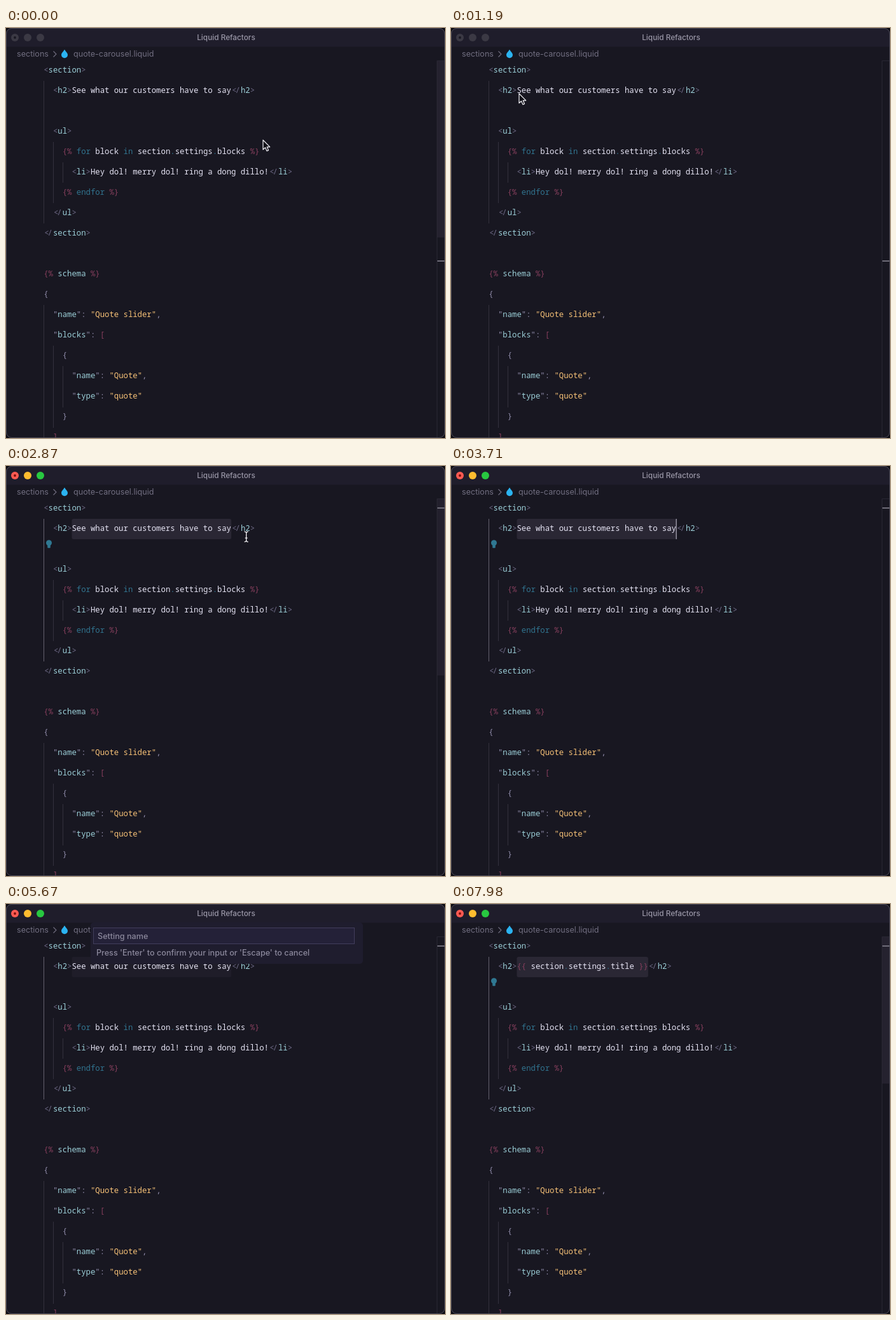
Recreate the animation shown at these times as an HTML page. Size 690 px wide and 644 px high, loop 8 s.

```html
<!DOCTYPE html>
<html lang="en">
<head>
<meta charset="utf-8">
<title>Liquid Refactors</title>
<style>
html, body { margin: 0; width: 100%; height: 100%; overflow: hidden; background: #0c0b12; }
svg { display: block; width: 100vw; height: 100vh; }
text { font: 500 12.6px Inter, Roboto, sans-serif; fill: #8b889c; white-space: pre; }
.code text { font: 500 12.29px "Noto Sans Mono", "DejaVu Sans Mono", monospace; }
.code .g { fill: #6e6a86; }
.code .b { fill: #908caa; }
.code .f { fill: #9ccfd8; }
.code .l { fill: #863f5d; }
.code .p { fill: #31748f; }
.code .w { fill: #e6e4f4; }
.code .y { fill: #f6c177; }
.crumb text { font-weight: 400; fill: #716e80; }
.panel { fill: #1f1d2e; }
.bulb { fill: #2f7892; }
</style>
</head>
<body>
<svg id="stage" viewBox="0 0 690 644" xmlns="http://www.w3.org/2000/svg">
  <defs>
    <clipPath id="frame"><rect width="690" height="644" rx="9"/></clipPath>
    <g id="bulb">
      <circle cy="-1.8" r="4.5"/>
      <path d="M-2.3 1.5H2.3V5.2Q2.3 6.2 1.3 6.2H-1.3Q-2.3 6.2 -2.3 5.2Z"/>
    </g>
  </defs>
  <g clip-path="url(#frame)">
    <rect width="690" height="644" fill="#181721"/>
    <rect width="690" height="29.5" fill="#1f1d2b"/>
    <text x="346" y="19" text-anchor="middle" style="font-size:11.8px;fill:#9996a6">Liquid Refactors</text>
    <g id="lights">
      <circle cx="14" cy="15" r="6"/>
      <circle cx="34" cy="15" r="6"/>
      <circle cx="54" cy="15" r="6"/>
    </g>
    <circle id="dot" cx="14" cy="15" r="1.9"/>

    <g class="crumb">
      <text x="17" y="45">sections</text>
      <path d="M74.5 36.5L79 41L74.5 45.5" fill="none" stroke="#716e80" stroke-width="1.1"/>
      <path d="M92 33.8C93.5 36.8 97 39.4 97 42.2A5 5 0 0 1 87 42.2C87 39.4 90.500 36.8 92 33.8Z" fill="#2bb3f0"/>
      <text x="106" y="45">quote-carousel.liquid</text>
    </g>

    <rect id="slider" x="678" y="51" width="12" fill="#25222f"/>
    <path d="M690 51.5H677.5V644" fill="none" stroke="#292733"/>
    <rect id="mark" x="678" width="12" height="2" fill="#6f6d79"/>

    <rect id="selection" y="83" height="32" rx="3"/>
    <g id="guides"></g>
    <g id="code" class="code"></g>
    <rect id="caret" y="83" width="1.6" height="32" fill="#8d8a99"/>
    <use id="hint" class="bulb" href="#bulb" x="67.5" y="122.500"/>

    <g id="menu">
      <rect class="panel" x="103" y="117" width="212" height="108" rx="5"/>
      <rect id="choice" x="109" width="198" height="23" rx="3" fill="#2b293c"/>
      <text x="118" y="139" style="font-size:12.1px;font-weight:600">More Actions...</text>
      <g id="items"></g>
    </g>

    <g id="prompt">
      <rect class="panel" x="133" y="29" width="428" height="65" rx="5"/>
      <rect x="137.5" y="37.5" width="410" height="25" fill="#242138" stroke="#423e5c"/>
      <text id="entry" x="144" y="55"></text>
      <rect id="inputCaret" y="43" width="1.3" height="15" fill="#e0def4"/>
      <text x="142" y="81">Press 'Enter' to confirm your input or 'Escape' to cancel</text>
    </g>

    <path id="arrow" d="M0 0V15L3.500 11.8L6 17.200L8.500 16.100L6.200 10.800H10.800Z" fill="#111017" stroke="#f4f3f8" stroke-width="1.200" stroke-linejoin="round"/>
    <g id="beam" fill="none">
      <path d="M-3 -8Q0 -8 0 -5.500Q0 -8 3 -8M0 -5.500V5.500M-3 8Q0 8 0 5.500Q0 8 3 8M-2 2H2" stroke="#111017" stroke-width="3"/>
      <path d="M-3 -8Q0 -8 0 -5.500Q0 -8 3 -8M0 -5.500V5.500M-3 8Q0 8 0 5.500Q0 8 3 8M-2 2H2" stroke="#f4f3f8" stroke-width="1.300"/>
    </g>
  </g>
  <rect x=".5" y=".5" width="689" height="643" rx="8.500" fill="none" stroke="#4c4a56"/>
</svg>
<script>
const LOOP = 8000, LEFT = 59.2, CHAR = 7.374, ROW = 32;
const SVG = 'http://www.w3.org/2000/svg';
const $ = id => document.getElementById(id);
const set = (el, attrs) => { for (const k in attrs) el.setAttribute(k, attrs[k]); };
const show = (el, on) => set(el, { visibility: on ? 'visible' : 'hidden' });
const add = (parent, tag, attrs, content = '') => {
  const el = document.createElementNS(SVG, tag);
  set(el, attrs);
  el.textContent = content;
  return parent.appendChild(el);
};
const column = n => LEFT + n * CHAR;
const ramp = (t, a, b) => Math.min(1, Math.max(0, (t - a) / (b - a)));
const ease = p => p * p * (3 - 2 * p);
const mix = (a, b, p) => a + (b - a) * p;
const within = (t, a, b) => t >= a && t < b;
const blink = (t, start, half = 500) => Math.floor((t - start) / half) % 2 === 0;

// Runs are split by "~"; the first letter of each run is its colour class.
const lines = [
  [0, 0, 'g<~fsection~g>'],
  [3, 2, 'g<~ful~g>'],
  [4, 4, 'l{% ~pfor ~wblock ~pin ~wsection~p.~wsettings~p.~wblocks ~l%}'],
  [5, 6, 'g<~fli~g>~wHey dol! merry dol! ring a dong dillo!~g</~fli~g>'],
  [6, 4, 'l{% ~pendfor ~l%}'],
  [7, 2, 'g</~ful~g>'],
  [8, 0, 'g</~fsection~g>'],
  [10, 0, 'l{% ~fschema ~l%}'],
  [11, 0, 'b{'],
  [12, 2, 'b"~fname~b": ~y"Quote slider"~b,'],
  [13, 2, 'b"~fblocks~b": ~l['],
  [14, 4, 'b{'],
  [15, 6, 'b"~fname~b": ~y"Quote"~b,'],
  [16, 6, 'b"~ftype~b": ~y"quote"'],
  [17, 4, 'b}'],
  [18, 2, 'l]']
];

function addLine(row, indent, source) {
  const line = add($('code'), 'text', { y: 70 + row * ROW });
  let col = indent;
  for (const run of source.split('~')) {
    const chars = run.slice(1), closing = chars === '</';
    const attrs = { class: run[0], x: column(col) + (closing ? 1 : 0) };
    if (closing) attrs['letter-spacing'] = -2;
    add(line, 'tspan', attrs, chars);
    col += chars.length;
  }
  return line;
}

const heading = body => addLine(1, 2, `g<~fh2~g>~${body}~g</~fh2~g>`);
lines.forEach(line => addLine(...line));
const before = heading('wSee what our customers have to say');
const after = heading('l{{ ~wsection~p.~wsettings~p.~wtitle ~l}}');

const guides = [[0, 83, 307], [2, 179, 275], [4, 211, 243], [0, 435, 644], [2, 499, 628], [4, 531, 596]]
  .map(([col, top, bottom]) => add($('guides'), 'rect', {
    x: Math.round(column(col)), y: top, width: 1, height: bottom - top, fill: '#33313d'
  }));

const items = ['locales', 'schema setting', 'block setting'].map((name, i) => {
  add($('items'), 'use', { class: 'bulb', href: '#bulb', x: 126, y: 159.5 + 24 * i });
  return add($('items'), 'text', { x: 142, y: 165 + 24 * i }, 'Extract to ' + name);
});

const FOCUS = 1330, DRAG = 1470, RELEASE = 2310, LEAVE = 2730;
const MENU = 3920, NEXT = 4830, PROMPT = 5110, CONFIRM = 7140, REPLACE = 7280;
const keyTimes = [6510, 6650, 6720, 6860, 6930];

function drawWindow(t) {
  const focused = t >= FOCUS;
  const colours = focused ? ['#ff5a52', '#fdbc2f', '#28c840'] : ['#3b3944', '#3b3944', '#3b3944'];
  [...$('lights').children].forEach((light, i) => set(light, { fill: colours[i] }));
  set($('dot'), { fill: focused ? '#7a0f0c' : '#191822' });
  set(guides[0], { fill: focused ? '#64616f' : '#33313d' });
  set($('mark'), { y: focused ? 65 : 365 });

  let opacity = 1 - ramp(t, 0, 840);
  if (t >= FOCUS) opacity = ramp(t, FOCUS, FOCUS + 100) * (1 - ramp(t, 2800, 3570));
  if (t >= REPLACE) opacity = ramp(t, REPLACE, REPLACE + 100);
  set($('slider'), { opacity, height: t < REPLACE ? 278 : 231 });
}

function drawEditor(t, drag) {
  const replaced = t >= REPLACE;
  const count = replaced ? 28 : Math.round(34 * drag);
  const away = within(t, MENU, CONFIRM);
  show(before, !replaced);
  show(after, replaced);
  set($('selection'), { x: column(6), width: count * CHAR, fill: away ? '#1f1d29' : '#2a2734' });

  const held = within(t, FOCUS, RELEASE);
  const blinking = within(t, RELEASE, MENU) && blink(t, RELEASE);
  const back = t >= CONFIRM && blink(t, CONFIRM);
  set($('caret'), { x: column(6 + count) - .8 });
  show($('caret'), held || blinking || back);
  show($('hint'), within(t, 2590, PROMPT) || t >= 7630);
}

function drawPopups(t) {
  const picked = t < NEXT ? 0 : 1;
  show($('menu'), within(t, MENU, PROMPT));
  set($('choice'), { y: 148.5 + 24 * picked });
  items.forEach((item, i) => { item.style.fill = i === picked ? '#e4e2f2' : '#8b889c'; });

  const open = within(t, PROMPT, CONFIRM);
  const typed = 'title'.slice(0, keyTimes.filter(k => t >= k).length);
  const entry = $('entry');
  entry.textContent = typed || 'Setting name';
  entry.style.fill = typed ? '#e0def4' : '#8b889c';
  show($('prompt'), open);
  set($('inputCaret'), { x: 144 + (typed ? entry.getComputedTextLength() + .5 : 0) });
  show($('inputCaret'), open && (typed !== '' || blink(t, PROMPT, 530)));
}

function drawPointer(t, drag) {
  const p = ease(ramp(t, 0, 1120));
  set($('arrow'), { transform: `translate(${mix(404, 107, p)} ${mix(176, 103, p)})` });
  show($('arrow'), t < FOCUS);
  const out = ramp(t, LEAVE, 3300) ** 2;
  const x = mix(mix(104, 356, drag), 710, out);
  const y = mix(mix(109, 106, drag), 190, out);
  set($('beam'), { transform: `translate(${x} ${y})` });
  show($('beam'), within(t, FOCUS, 3300));
}

function draw(t) {
  const drag = ease(ramp(t, DRAG, RELEASE));
  drawWindow(t);
  drawEditor(t, drag);
  drawPopups(t);
  drawPointer(t, drag);
}

const start = performance.now();
function tick() {
  draw((performance.now() - start) % LOOP);
  requestAnimationFrame(tick);
}
tick();
</script>
</body>
</html>
```
